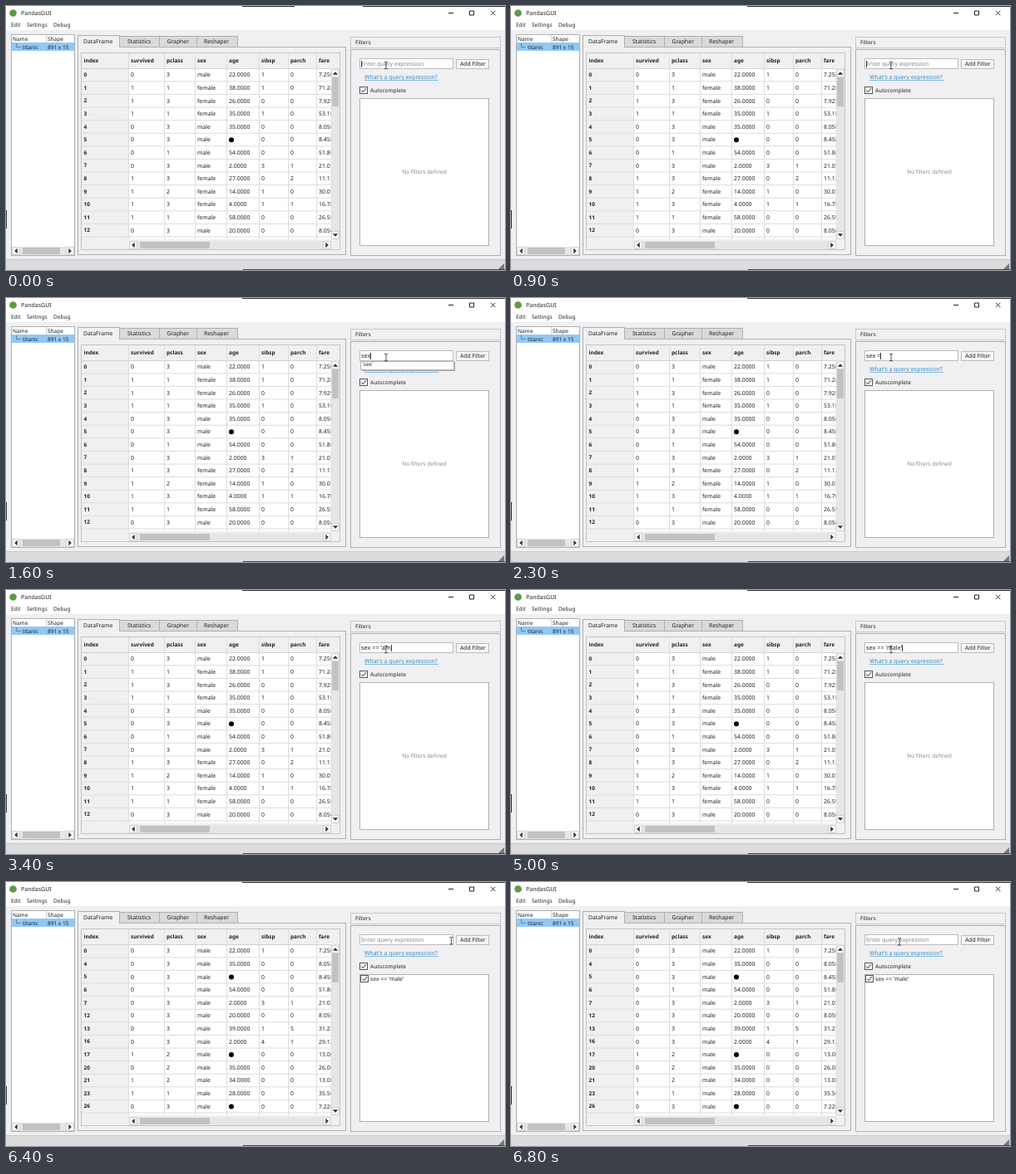
Animation of 600 by 318 pixels, one loop 8 s. Source, as an HTML page:

```html
<!DOCTYPE html>
<html lang="en">
<head>
<meta charset="utf-8">
<title>PandasGUI</title>
<style>
html, body { margin: 0; width: 100%; height: 100%; overflow: hidden; background: #f0eff1; }
svg { display: block; width: 100%; height: 100%; }
text { font-family: "Noto Sans", "Open Sans", sans-serif; text-rendering: geometricPrecision; white-space: pre; }
rect { shape-rendering: crispEdges; }
</style>
</head>
<body>
<svg id="stage" viewBox="0 0 600 318">
  <defs>
    <clipPath id="tableClip"><rect x="91" y="57" width="299.5" height="224"/></clipPath>
  </defs>
  <g id="window"></g>
  <g id="edge"></g>
  <g id="rows" clip-path="url(#tableClip)"></g>
  <g id="filters"></g>
  <g id="query"></g>
  <g id="popup"></g>
  <g id="pointer"></g>
</svg>
<script>
const LOOP = 8000;
const INK = '#222', FACE = '#f0eff1', TRACK = '#e6e5e7', THUMB = '#c2c1c3', LINE = '#b0afb1';
const layer = id => document.getElementById(id);

const rect = (x, y, w, h, fill, stroke) => stroke
  ? `<rect x="${x + .5}" y="${y + .5}" width="${w - 1}" height="${h - 1}" fill="${fill}" stroke="${stroke}"/>`
  : `<rect x="${x}" y="${y}" width="${w}" height="${h}" fill="${fill}"/>`;
const path = (d, stroke = INK, width = 1, fill = 'none') =>
  `<path d="${d}" fill="${fill}" stroke="${stroke}" stroke-width="${width}"/>`;
const text = (x, y, label, size = 6.8, color = INK, extra = '') =>
  `<text x="${x}" y="${y}" font-size="${size}" fill="${color}" ${extra}>${label}</text>`;
const bold = (x, y, label) => text(x, y, label, 6.5, INK, 'font-weight="700"');

function arrowButton(x, y, dir) {
  const turn = { up: 0, right: 90, down: 180, left: 270 }[dir];
  return rect(x, y, 10, 10, '#f6f5f7', '#d2d1d3') +
    `<path d="M-3.2 1.7L0 -1.8L3.2 1.7Z" fill="#333" transform="translate(${x + 5} ${y + 5}) rotate(${turn})"/>`;
}

function hScroll(x, y, w, thumbX, thumbW) {
  return rect(x, y, w, 10, TRACK) + rect(thumbX, y + 1, thumbW, 8, THUMB) +
    arrowButton(x, y, 'left') + arrowButton(x + w - 10, y, 'right');
}

function checkbox(x, y) {
  return rect(x, y, 10, 9, '#fff', '#555') +
    path(`M${x + 2.2} ${y + 4.5}l2 2.2l3.8 -4.6`, INK, 1);
}

// Table contents: survived, pclass, sex, age, sibsp, parch, fare
const passengers = {
  0: '0 3 male 22 1 0 7.2500',
  1: '1 1 female 38 1 0 71.2833',
  2: '1 3 female 26 0 0 7.9250',
  3: '1 1 female 35 1 0 53.1000',
  4: '0 3 male 35 0 0 8.0500',
  5: '0 3 male - 0 0 8.4583',
  6: '0 1 male 54 0 0 51.8625',
  7: '0 3 male 2 3 1 21.0750',
  8: '1 3 female 27 0 2 11.1333',
  9: '1 2 female 14 1 0 30.0708',
  10: '1 3 female 4 1 1 16.7000',
  11: '1 1 female 58 0 0 26.5500',
  12: '0 3 male 20 0 0 8.0500',
  13: '0 3 male 39 1 5 31.2750',
  16: '0 3 male 2 4 1 29.1250',
  17: '1 2 male - 0 0 13.0000',
  20: '0 2 male 35 0 0 26.0000',
  21: '1 2 male 34 0 0 13.0000',
  23: '1 1 male 28 0 0 35.5000',
  26: '0 3 male - 0 0 7.2250'
};
const columns = ['survived', 'pclass', 'sex', 'age', 'sibsp', 'parch', 'fare'];
const edges = [147, 190, 227, 265, 304, 339, 373];
const TOP = 75, PITCH = 15.6;

function drawWindow() {
  const tabs = [['Statistics', 136, 48, 146], ['Grapher', 184, 45, 193.5], ['Reshaper', 229, 49, 238]];
  let s = rect(0, 0, 600, 318, FACE) + rect(0, 0, 600, 29, '#fff');

  // Title bar and menu
  s += '<circle cx="8.5" cy="8.5" r="4.3" fill="#5f9a46"/>' + text(18, 11.3, 'PandasGUI', 7);
  s += path('M532 8.5h6') + path('M557.5 6h5v5h-5z') + path('M583 5.8l5.4 5.4m0 -5.4l-5.4 5.4', INK, .9);
  s += text(6, 25, 'Edit', 6.5) + text(25, 25, 'Settings', 6.5) + text(57, 25, 'Debug', 6.5);

  // Data set list
  s += rect(6, 34, 77, 267, '#fff', LINE) + rect(7, 44, 75, 10, '#90c8f6');
  s += rect(48, 35, 1, 9, '#d5d5d5');
  s += text(8, 42.3, 'Name', 6.5) + text(50, 42.3, 'Shape', 6.5);
  s += path('M12.5 45v4.5h5', '#667', .8);
  s += text(20, 51.5, 'titanic', 6.5) + text(50, 51.5, '891 x 15', 6.5);
  s += hScroll(7, 290, 75, 20, 45);

  // Tabs
  s += rect(86, 49, 323, 251, FACE, LINE);
  for (const [label, x, w, tx] of tabs)
    s += rect(x, 36, w + 1, 14, '#dad9db', LINE) + text(tx, 45, label);
  s += rect(86, 35, 51, 15, FACE, LINE) + rect(87, 49, 49, 1, FACE) + text(93, 45, 'DataFrame');

  // Table frame and scroll bars
  s += rect(90, 56, 312, 238, FACE, '#c4c3c5') + rect(147, 75, 243, 206, '#fff');
  s += rect(391, 75, 10, 206, TRACK) + rect(392, 86, 8, 35, THUMB);
  s += arrowButton(391, 76, 'up') + arrowButton(391, 271, 'down');
  s += hScroll(148, 283, 243, 161, 84);

  // Filter dock
  s += rect(414, 37, 181, 14, FACE, '#c8c7c9') + text(420, 46.3, 'Filters', 6.5);
  s += rect(414, 52, 181, 249, FACE, LINE);
  s += rect(541, 64, 40, 12, '#f6f5f7', '#bdbcbe') + text(546, 72.4, 'Add Filter');
  s += text(431, 88, "What's a query expression?", 6.9, '#2a8ccb') + rect(431, 89, 89, 1, '#7db9e0');
  s += checkbox(425, 97) + text(438, 104.3, 'Autocomplete', 6.5);
  s += rect(425, 111, 156, 178, '#fff', LINE);

  // Status bar and outer edges
  s += rect(0, 305, 600, 13, '#dcdbdd') + rect(0, 305, 600, 1, '#cac9cb');
  s += path('M592 317l7 -7v7z', 'none', 0, '#777');
  s += rect(285, 317, 315, 1, '#444') + rect(0, 246, 1, 22, '#333');
  return s;
}

const drawEdge = joined => joined
  ? rect(284, 0, 316, 1, '#333')
  : rect(284, 0, 63, 1, '#333') + rect(429, 0, 171, 1, '#333');

function drawRows(filtered) {
  const shown = Object.entries(passengers)
    .filter(([id, row]) => filtered ? row.includes(' male') : id <= 12)
    .slice(0, 13);
  let s = '';
  edges.forEach((x, i) => {
    s += rect(x, 57, 1, 224, '#dddcde') + bold(x + 3, 68.3, columns[i]);
  });
  s += bold(93.5, 68.3, 'index') + rect(91, TOP, 300, 1, '#d2d1d3');
  shown.forEach(([id, row], r) => {
    const y = TOP + r * PITCH, base = y + 10.4;
    s += path(`M91 ${y + PITCH + .2}h300`, '#dddcde') + bold(93.5, base - .2, id);
    row.split(' ').forEach((value, c) => {
      const x = edges[c] + 3;
      if (value === '-') s += `<circle cx="271" cy="${y + 8.2}" r="3" fill="#000"/>`;
      else s += text(x, base, c === 3 ? value + '.0000' : value, 6.9);
    });
  });
  return s;
}

const drawFilters = filtered => filtered
  ? checkbox(426, 112) + text(438, 118.6, "sex == 'male'")
  : text(503, 202.3, 'No filters defined', 6.6, '#8a8a8a', 'text-anchor="middle"');

// Field text over time
const typing = [
  [0, ''], [1300, 's'], [1400, 'se'], [1600, 'sex'], [1900, 'sex '], [2300, 'sex ='],
  [2400, 'sex =='], [2600, 'sex == '], [2900, "sex == '"], [3200, "sex == 'a"],
  [3400, "sex == 'am"], [3700, "sex == 'a"], [3800, "sex == '"], [4000, "sex == 'm"],
  [4200, "sex == 'ma"], [4400, "sex == 'male"], [5000, "sex == 'male'"], [6300, '']
];
const caretSteps = [[0, true], [400, false], [900, true], [5600, false]];
const popupSteps = [
  [0, []],
  [1300, ['`survived`', '`pclass`', '`sex`', '`sibsp`', '`class`', '"False"', '"yes"', '"First"']],
  [1400, ['`sex`', '"False"', '"Second"', '"second"']],
  [1600, ['`sex`']],
  [1900, []]
];
const pointerPath = [
  [0, 457, 71.5], [5500, 457, 71.5], [5700, 476, 76], [5850, 518, 77],
  [6000, 549, 68], [6300, 549, 68], [6550, 515, 75], [6800, 467, 72]
];
const stepAt = (steps, t) => steps.filter(([start]) => start <= t).pop()[1];

function drawQuery(value, caret) {
  layer('query').innerHTML = rect(425, 63, 113, 13, '#fff', '#bdbcbe') + (value
    ? text(427, 72.4, value, 7.3)
    : text(427, 72.4, 'Enter query expression', 6.95, '#858585'));
  if (!caret) return;
  const label = layer('query').querySelector('text');
  const x = 427 + (value ? label.getComputedTextLength() : 0);
  layer('query').innerHTML += rect(Math.round(x), 66, 1, 8, '#333');
}

function drawPopup(items) {
  if (!items.length) return '';
  const long = items.length > 7;
  const h = long ? 62 : Math.round(items.length * 8.4 + 3);
  let s = rect(428, 77, 112, h, '#a3a2a4') + rect(426, 76, 113, h, '#fff', '#b5b4b6');
  items.slice(0, 7).forEach((item, i) => { s += text(428, 82.4 + i * 8.4, item, 6.6); });
  if (long) {
    s += `<svg x="427" y="134" width="100" height="3">${text(1, 7, items[7], 6.6)}</svg>`;
    s += rect(529, 77, 9, 60, '#f6f5f7') + rect(530, 84, 7, 25, '#e6e5e7');
    s += path('M531.4 81l2.1 -2.4l2.1 2.4z', 'none', 0, '#444');
    s += path('M531.4 132.6l2.1 2.4l2.1 -2.4z', 'none', 0, '#444');
  }
  return s;
}

function pointerAt(t) {
  const next = pointerPath.findIndex(p => p[0] > t);
  if (next < 0) return pointerPath[pointerPath.length - 1].slice(1);
  const [t0, x0, y0] = pointerPath[next - 1], [t1, x1, y1] = pointerPath[next];
  const k = (t - t0) / (t1 - t0);
  return [x0 + (x1 - x0) * k, y0 + (y1 - y0) * k];
}

function drawPointer([x, y]) {
  const overField = x < 538 && y < 76;
  const shape = overField
    ? path('M-2 -4.2h1.5l.5 .5l.5 -.5h1.5M0 -4v8M-2 4.2h1.5l.5 -.5l.5 .5h1.5', '#222', .8)
    : path('M0 0V9.2L2.2 7.2L3.7 10.6L5.2 9.9L3.7 6.6H6.6Z', '#000', .7, '#fff');
  return `<g transform="translate(${x} ${y})">${shape}</g>`;
}

const drawn = {};
function update(id, state, paint) {
  const key = JSON.stringify(state);
  if (drawn[id] === key) return;
  drawn[id] = key;
  paint();
}
const put = (id, state, draw) => update(id, state, () => { layer(id).innerHTML = draw(state); });

function render(t) {
  const filtered = t >= 6300;
  const value = stepAt(typing, t), caret = stepAt(caretSteps, t);
  put('edge', t >= 300, drawEdge);
  put('rows', filtered, drawRows);
  put('filters', filtered, drawFilters);
  update('query', [value, caret], () => drawQuery(value, caret));
  put('popup', stepAt(popupSteps, t), drawPopup);
  put('pointer', pointerAt(Math.floor(t / 100) * 100), drawPointer);
}

layer('window').innerHTML = drawWindow();
const start = performance.now();
function tick() {
  render((performance.now() - start) % LOOP);
  requestAnimationFrame(tick);
}
tick();
</script>
</body>
</html>
```
